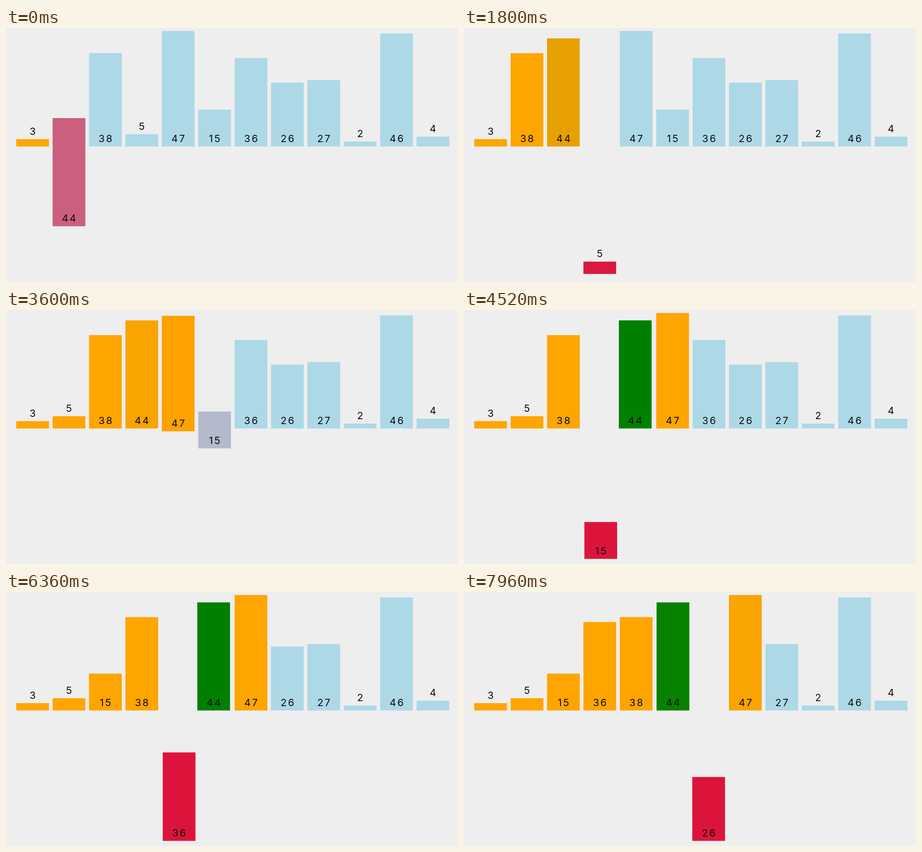
These frames come from a looping animation (998x561 px, 8 s). An HTML page with a canvas:

```html
<!DOCTYPE html>
<html lang="en">
<head>
<meta charset="utf-8">
<title>Insertion sort</title>
<style>
  html, body { margin: 0; width: 100%; height: 100%; overflow: hidden; background: #eee; }
  canvas { display: block; }
</style>
</head>
<body>
<canvas id="stage" width="998" height="561"></canvas>
<script>
const ctx = document.getElementById('stage').getContext('2d');
const LOOP = 8000, TICK = 40;
const LEFT = 22.6, PITCH = 80.36, BAR_WIDTH = 72.3;
const BASE = 261.7, DROP = 288, UNIT = 5.427;
const LETTER_GAP = 3;
const BLUE = [173, 216, 230], ORANGE = [255, 165, 0], GREEN = [0, 128, 0], RED = [220, 20, 60];

// Each step is cut short by the next one, so its easing only runs this far.
const REACH = 0.815;
// [time in ms, sorting step], linear in between
const PACE = [[0, 0.663], [1000, 5.417], [2560, 13.1], [3600, 18.413],
              [5440, 27.58], [6360, 32.1], [7960, 40.166], [8160, 41.166]];

const ease = t => t < 0.5 ? 4 * t ** 3 : 1 - 4 * (1 - t) ** 3;
const mix = (from, to, p) => from.map((v, i) => v + (to[i] - v) * p);

const bars = [3, 44, 38, 5, 47, 15, 36, 26, 27, 2, 46, 4]
  .map((value, slot) => ({ value, slot, drop: 0, color: slot ? BLUE : ORANGE }));
const pose = bar => [bar.slot, bar.drop, ...bar.color];

function planSteps() {
  const steps = [], order = [...bars];
  let current = bars.map(pose);
  const record = () => {
    const target = bars.map(pose);
    steps.push({ from: current, to: target });
    current = current.map((from, i) => mix(from, target[i], ease(REACH)));
  };
  for (let i = 1; i < order.length; i++) {
    const key = order[i];
    Object.assign(key, { drop: 1, color: RED });
    record();
    for (let j = i - 1; j >= 0; j--) {
      const other = order[j];
      other.color = GREEN;
      record();
      const shift = other.value > key.value;
      if (shift) {
        [order[j], order[j + 1]] = [key, other];
        other.slot++;
        key.slot--;
        record();
      }
      other.color = ORANGE;
      if (!shift) break;
    }
    Object.assign(key, { drop: 0, color: ORANGE });
    record();
  }
  return steps;
}

const steps = planSteps();

function stepAt(time) {
  const i = PACE.findIndex(([t]) => t > time);
  const [t0, s0] = PACE[i - 1], [t1, s1] = PACE[i];
  return s0 + (s1 - s0) * (time - t0) / (t1 - t0);
}

function drawBar(value, [slot, drop, ...color]) {
  const x = LEFT + slot * PITCH;
  const bottom = BASE + drop * DROP;
  const height = value * UNIT;
  ctx.fillStyle = `rgb(${color.map(Math.round)})`;
  ctx.fillRect(x, bottom - height, BAR_WIDTH, height);
  ctx.fillStyle = '#0c0c0c';
  const baseline = (value < 10 ? bottom - height : bottom) - 9.5;
  ctx.fillText(value, x + (BAR_WIDTH + LETTER_GAP) / 2, baseline);
}

function draw(time) {
  const step = stepAt(time);
  const { from, to } = steps[Math.floor(step)];
  const progress = ease(REACH * (step % 1));
  ctx.fillStyle = '#eee';
  ctx.fillRect(0, 0, 998, 561);
  ctx.font = '22px Inter, "DejaVu Sans", sans-serif';
  ctx.letterSpacing = LETTER_GAP + 'px';
  ctx.textAlign = 'center';
  bars.forEach((bar, i) => drawBar(bar.value, mix(from[i], to[i], progress)));
}

const start = performance.now();
function frame() {
  const time = (performance.now() - start) % LOOP;
  draw(Math.floor(time / TICK) * TICK);
  requestAnimationFrame(frame);
}
frame();
</script>
</body>
</html>
```
